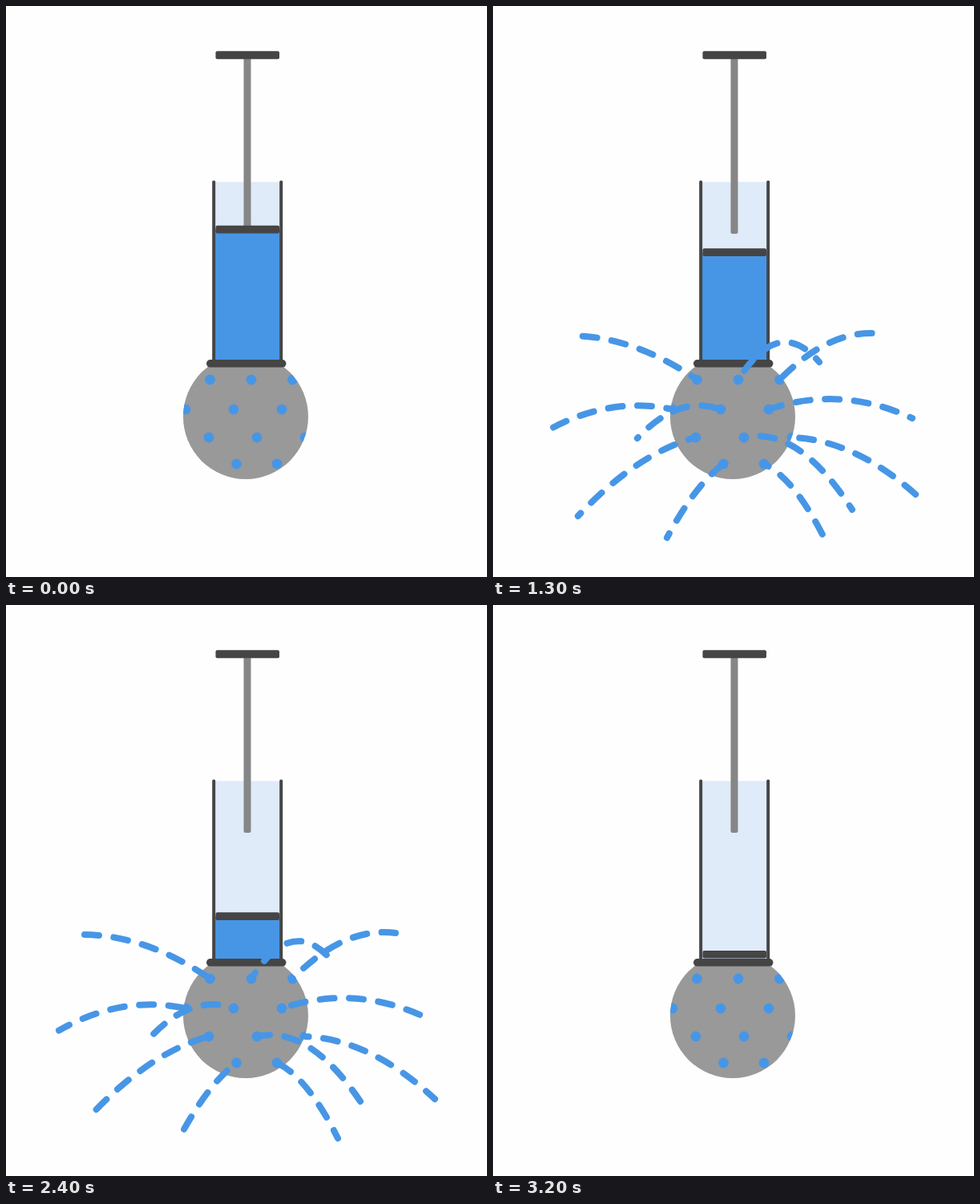
An HTML page with a canvas that plays this animation: 600x712 px, repeating every 4.1 s.

```html
<!DOCTYPE html>
<html lang="en">
<head>
<meta charset="utf-8">
<title>Syringe and sprinkler ball</title>
<style>
html, body { margin: 0; width: 100%; height: 100%; overflow: hidden; background: #fefefe; }
canvas { display: block; }
</style>
</head>
<body>
<canvas id="stage" width="600" height="712"></canvas>
<script>
const ctx = document.getElementById('stage').getContext('2d');
const BLUE = '#4796e6', DARK = '#454545', PALE = '#dfebf9', BALL = '#999', ROD = '#868686';
const LOOP = 4100, STEP = 100, START = 500, END = 3200;
const DASH = 18, PERIOD = 36.5, FLOW = 0.079; // FLOW: px per ms, outwards

// Rows of evenly spaced holes; each hole feeds one jet with a tip,
// a rise above the straight line, and a dash lead at the tip
const rows = [
  { x: 254.5, y: 466, gap: 51.5, jets: [
    { tip: [96, 411], rise: 13.5, lead: 11 },
    { tip: [407, 444], rise: 35, lead: -17 },
    { tip: [486, 409], rise: 18.5, lead: 8.5 }] },
  { x: 224, y: 503, gap: 60, jets: [
    { tip: [66, 530.5], rise: 15.5, lead: 5.5 },
    { tip: [180, 539], rise: 18.5, lead: 15 },
    { tip: [523, 514], rise: 18, lead: 16.5 }] },
  { x: 253, y: 538, gap: 60, jets: [
    { tip: [106, 636], rise: 14.5, lead: 18.5 },
    { tip: [448, 628], rise: 30, lead: -17 },
    { tip: [535, 616], rise: 18, lead: 5.5 }] },
  { x: 287.5, y: 571, gap: 50.5, jets: [
    { tip: [217, 663], rise: 10, lead: -17 },
    { tip: [414, 665], rise: 14.5, lead: 2 }] }
];
const jets = rows.flatMap(row =>
  row.jets.map((jet, i) => ({ ...jet, x: row.x + i * row.gap, y: row.y })));

// The piston speeds up gently until it meets the bottom
function pistonY(t) {
  const u = Math.min(1, Math.max(0, (t - 640) / 2290));
  return 278.6 + 157.1 * u ** 1.37;
}

function box(x, y, w, h, color, r = 0) {
  ctx.fillStyle = color;
  ctx.beginPath();
  ctx.roundRect(x, y, w, h, r);
  ctx.fill();
}

function disc(x, y, r, color) {
  ctx.fillStyle = color;
  ctx.beginPath();
  ctx.arc(x, y, r, 0, 2 * Math.PI);
  ctx.fill();
}

function drawBall() {
  ctx.save();
  ctx.beginPath();
  ctx.arc(299, 512, 78, 0, 2 * Math.PI);
  ctx.clip();
  box(220, 433, 158, 158, BALL);
  for (const { x, y } of jets) disc(x, y, 6.4, BLUE);
  ctx.restore();
}

function drawSyringe(y) {
  box(259, 219.5, 84, 222, PALE);
  if (y < 435) box(261, y, 81, 441 - y, BLUE);
  box(296.5, 62, 9, 222, ROD, 2);
  box(261.5, 56.3, 79.5, 10, DARK, 2);
  box(261.5, y - 4.8, 79.5, 9.6, DARK, 2);
  for (const x of [257.2, 341.2]) box(x, 217.5, 4, 226, DARK, 2);
  box(250, 441, 99.5, 9.6, DARK, 4.8);
}

// Each jet is a parabola, stroked from its tip back to its hole
function drawJets(t) {
  ctx.strokeStyle = BLUE;
  ctx.lineWidth = 8;
  ctx.lineCap = 'round';
  ctx.setLineDash([DASH, PERIOD - DASH]);
  for (const { x, y, tip: [tx, ty], rise, lead } of jets) {
    ctx.lineDashOffset = (t - 900) * FLOW - lead;
    ctx.beginPath();
    ctx.moveTo(tx, ty);
    ctx.quadraticCurveTo((x + tx) / 2, (y + ty) / 2 - 2 * rise, x, y);
    ctx.stroke();
  }
}

function draw(now) {
  const t = Math.floor(now % LOOP / STEP) * STEP;
  ctx.fillStyle = '#fefefe';
  ctx.fillRect(0, 0, 600, 712);
  drawBall();
  drawSyringe(pistonY(t));
  if (t >= START && t < END) drawJets(t);
  requestAnimationFrame(draw);
}
requestAnimationFrame(draw);
</script>
</body>
</html>
```
